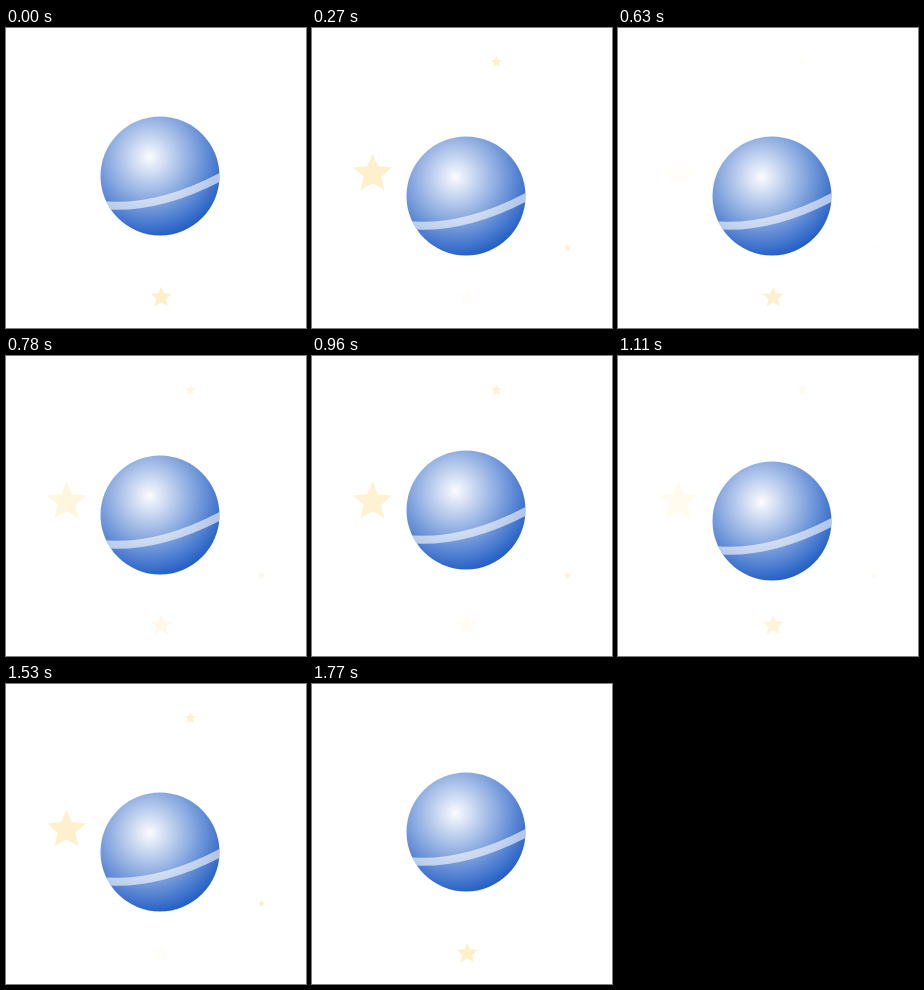
These frames come from a looping animation (300x300 px, 1.8 s). An HTML page:

```html
<!DOCTYPE html>
<html lang="en">
<head>
<meta charset="utf-8">
<title>Bobbing planet</title>
<style>
  html, body { margin: 0; width: 100%; height: 100%; overflow: hidden; background: #fff; }
  svg { display: block; width: 100vw; height: 100vh; }
</style>
</head>
<body>
<svg viewBox="0 0 300 300">
  <defs>
    <radialGradient id="shade" gradientUnits="userSpaceOnUse" cx="143.5" cy="129" r="80">
      <stop offset="0" stop-color="#fbfcfe"/>
      <stop offset="1" stop-color="#2560c5"/>
    </radialGradient>
    <clipPath id="disc"><circle cx="154" cy="148" r="59.5"/></clipPath>
  </defs>
  <g id="stars" fill="#fdf0c8"></g>
  <g id="planet">
    <circle cx="154" cy="148" r="59.5" fill="url(#shade)"/>
    <g clip-path="url(#disc)">
      <path d="M94 177Q152 183 220 146" fill="none" stroke="#fff" stroke-opacity=".6" stroke-width="8"/>
    </g>
  </g>
</svg>
<script>
const STEP = 30, STEPS = 60, DROP = 35;
const planet = document.getElementById('planet');
const layer = document.getElementById('stars');

function addStar(x, y, radius, inverse) {
  const points = Array.from({ length: 10 }, (_, i) => {
    const r = i % 2 ? radius * 0.46 : radius;
    const a = (i / 5 - 0.5) * Math.PI;
    return (x + r * Math.cos(a)).toFixed(2) + ',' + (y + r * Math.sin(a)).toFixed(2);
  });
  const node = document.createElementNS('http://www.w3.org/2000/svg', 'polygon');
  node.setAttribute('points', points.join(' '));
  layer.append(node);
  return { node, inverse };
}

const stars = [
  addStar(60.5, 145.8, 20.3, false),
  addStar(184.5, 34, 5.8, false),
  addStar(255.5, 219.7, 3.8, false),
  addStar(155.2, 269.4, 11, true)
];

// Rises 0 to 1 and falls back once per period.
const triangle = (step, period) => 1 - Math.abs(1 - 2 * (step % period) / period);

// Quick near both ends, slower in the middle.
function bob(x) {
  const d = x - 0.5;
  return 0.5 + 0.742 * d + 1.032 * d ** 3;
}

function draw(time) {
  const index = Math.floor(time / STEP) % STEPS;
  const step = index === STEPS - 1 ? 0 : index; // the loop closes on its first pose
  planet.setAttribute('transform', `translate(0 ${Math.round(DROP * bob(triangle(step, 30)))})`);
  const glow = triangle(step, 20);
  for (const { node, inverse } of stars) node.setAttribute('opacity', inverse ? 1 - glow : glow);
}

const start = performance.now();
function tick() {
  draw(performance.now() - start);
  requestAnimationFrame(tick);
}
tick();
</script>
</body>
</html>
```
